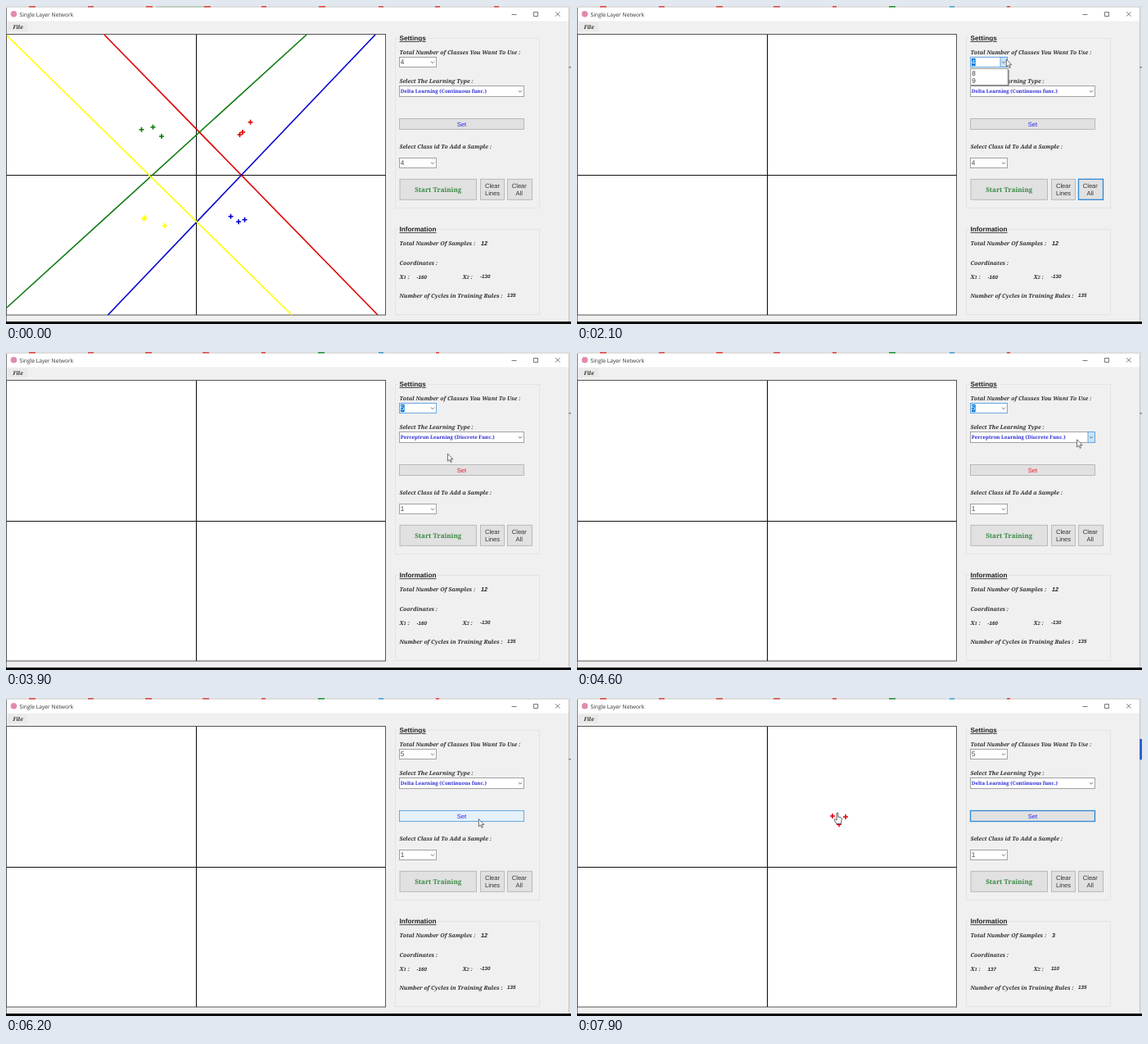
An HTML page that plays this animation: 690x388 px, repeating every 8 s.

```html
<!DOCTYPE html>
<html lang="en">
<head>
<meta charset="utf-8">
<title>Single Layer Network</title>
<style>
html, body { margin: 0; width: 100%; height: 100%; overflow: hidden; background: #f0f0f0; }
svg { display: block; width: 100vw; height: 100vh; }
text { white-space: pre; text-rendering: geometricPrecision; }
.label { font: italic bold 6.8px "Noto Serif", serif; fill: #2a2a2a; }
.combo { font: bold 6.1px "Noto Serif", serif; }
.train { font: bold 8px "Noto Serif", serif; fill: #3a8a44; }
.sans { font: 7.6px "Liberation Sans", Arial, sans-serif; fill: #333; }
.digit { font: 8.2px "Liberation Sans", Arial, sans-serif; }
.head { font: bold 8.2px "Liberation Sans", Arial, sans-serif; fill: #222; text-decoration: underline; }
.value { font: italic bold 6.2px "Liberation Sans", Arial, sans-serif; fill: #222; }
.title { font: 6.7px "Open Sans", "Noto Sans", sans-serif; fill: #333; }
.mid { text-anchor: middle; }
</style>
</head>
<body>
<svg id="stage" viewBox="0 0 690 388" preserveAspectRatio="none"></svg>
<script>
const LOOP = 8000, STEP = 100;
const BLUE = "#0078d7", SOFT_BLUE = "#5b9fdf";
const stage = document.getElementById("stage");

function add(tag, attrs, parent = stage) {
  const el = document.createElementNS("http://www.w3.org/2000/svg", tag);
  set(el, attrs);
  parent.appendChild(el);
  return el;
}
function set(el, attrs) {
  for (const key in attrs) el.setAttribute(key, attrs[key]);
}
const show = (el, on) => set(el, { visibility: on ? "visible" : "hidden" });
const group = (parent) => add("g", {}, parent);
const rect = (x, y, width, height, fill, stroke = "none", parent) =>
  add("rect", { x, y, width, height, fill, stroke }, parent);
const path = (d, stroke, width = 1, parent, fill = "none") =>
  add("path", { d, stroke, "stroke-width": width, fill }, parent);
function text(x, y, str, cls, parent, fill) {
  const el = add("text", { x, y, class: cls }, parent);
  el.textContent = str;
  if (fill) el.style.fill = fill;
  return el;
}

// Desktop edges and window frame
function ticks(list) {
  const g = group();
  for (const [x, w, color] of list) rect(x, 0, w, 1.6, color, "none", g);
  return g;
}
rect(0, 0, 690, 388, "#f0f0f0");
rect(0, 0, 690, 2, "#dedede");
const tabsBefore = ticks([[28, 8, "#e04b45"], [100, 7, "#d9534f"], [171, 8, "#e04b45"],
  [184, 60, "#b9cdbb"], [242, 8, "#e04b45"], [312, 6, "#e04b45"], [382, 8, "#e04b45"],
  [455, 6, "#d9534f"], [524, 6, "#e04b45"], [596, 6, "#d9534f"]]);
const tabsAfter = ticks([[28, 8, "#e04b45"], [100, 7, "#d9534f"], [170, 8, "#e04b45"],
  [240, 8, "#d9534f"], [312, 5, "#e04b45"], [381, 8, "#2c9a3f"], [455, 6, "#4aa3d8"],
  [525, 4, "#e04b45"]]);
rect(1, 2, 686, 16.5, "#fff");
rect(687, 2, 3, 383, "#e4e4e4");
path("M687.5 2V385", "#b5b5b5", .7);
rect(687, 74, 3, 1.5, "#8a8a8a");
const sideMark = rect(687, 50, 3, 25, "#2b63d9");
add("circle", { cx: 9.5, cy: 9.8, r: 3.8, fill: "#e28aae" });
text(16.5, 12.6, "Single Layer Network", "title");
path("M617.5 10.5H623.5M644.5 7.5H649.5V12.5H644.5ZM671 7.2L676.4 12.6M676.4 7.2L671 12.6", "#555", .8);
rect(2, 20, 24, 11, "#e9e9e9");
text(8.5, 28, "File", "label").style.fontSize = "6.5px";
rect(0, 385, 690, 3, "#060606");
path("M.4 2V385", "#555", .8);

// Plot area
rect(.5, 34.5, 463, 342.5, "#fff", "#555");
path("M232.5 35V377M1 206.5H463.5", "#111", 1.1);

const plus = (x, y, color, parent) =>
  path(`M${x - 3} ${y}h6M${x} ${y - 3}v6`, color, 1.6, parent);
const solved = group();
const classes = [
  ["#e00000", "M120 35L454 377", [[298.5, 141.7], [289, 154], [285.5, 157]]],
  ["#0b7a0b", "M1 368L367 35", [[165.5, 150.7], [179.5, 147.8], [190, 159]]],
  ["#0000d0", "M124.5 377L451 35", [[274.5, 256.7], [284, 263.3], [291.5, 260.8]]],
  ["#ffff00", "M1 36L349 377", [[169.2, 258.3], [168.4, 260], [194, 268]]]
];
for (const [color, line, points] of classes) {
  path(line, color, 1.6, solved);
  for (const [x, y] of points) plus(x, y, color, solved);
}
const samples = [
  { at: 7000, x: 320, y: 154.3 },
  { at: 7300, x: 328, y: 145 },
  { at: 7700, x: 312, y: 144 }
];
for (const s of samples) s.el = plus(s.x, s.y, "#e60012");

// Settings and information panels
function panel(y, h, title, titleY, w) {
  rect(475.5, y, 176, h, "none", "#e0e0e0").setAttribute("stroke-width", .8);
  rect(479, y - 2, w, 4, "#f0f0f0");
  text(480.5, titleY, title, "head");
}
panel(39.5, 207, "Settings", 42, 36);
panel(272.5, 104, "Information", 275.3, 47);
const labels = [
  [480.5, 58.6, "Total Number of Classes You Want To Use :"],
  [480.5, 93.6, "Select The Learning Type :"],
  [480.5, 174, "Select Class id To Add a Sample :"],
  [480.5, 291.8, "Total Number Of Samples :"],
  [480.5, 316, "Coordinates :"],
  [480.5, 355.6, "Number of Cycles in Training Rules :"]
];
for (const [x, y, str] of labels) text(x, y, str, "label");
function axisLabel(x, index) {
  const el = text(x, 333, "X", "label");
  add("tspan", { "font-size": 5.6 }, el).textContent = index;
  add("tspan", {}, el).textContent = " :";
}
axisLabel(480.5, 1);
axisLabel(557.5, 2);
const total = text(580, 292.2, "12", "value");
total.style.fontSize = "7.2px";
const coordX = text(501.5, 333.2, "", "value");
const coordY = text(579, 332, "", "value");
text(612, 355.4, "135", "value");

function combo(x, y, w, h, cls) {
  const box = rect(x + .5, y + .5, w - 1, h - 1, "#fff", "#999");
  box.setAttribute("stroke-width", .9);
  const arrow = rect(x + w - 9, y + .5, 8.5, h - 1, "#cce4f7", SOFT_BLUE);
  arrow.setAttribute("stroke-width", .9);
  const cx = x + w - 5, cy = y + h / 2 + .1;
  path(`M${cx - 2.1} ${cy - 1}l2.1 2.1l2.1 -2.1`, "#555", .8);
  const mark = rect(x + 1.8, y + 1.8, 1, h - 3.6, BLUE);
  const value = text(x + 1.8, y + h / 2 + (cls === "digit" ? 2.7 : 2.2), "", cls);
  return (str, color, { marked = false, hot = false } = {}) => {
    value.textContent = str;
    value.style.fill = marked ? "#fff" : color;
    show(mark, marked);
    show(arrow, hot);
    if (marked) set(mark, { width: value.getComputedTextLength() + .3 });
    set(box, { stroke: marked ? SOFT_BLUE : "#999" });
  };
}
const classCount = combo(480, 62, 46, 13, "digit");
const learning = combo(480, 97, 153, 14, "combo");
const classId = combo(480, 185, 46, 13, "digit");

const BUTTON_LOOK = {
  normal: ["#e1e1e1", "#b4b4b4", .9],
  hover: ["#e5f1fb", SOFT_BLUE, .9],
  down: ["#cce4f7", SOFT_BLUE, .9],
  focus: ["#e1e1e1", "#2f87d4", 1.3]
};
function button(x, y, w, h) {
  const el = rect(x, y, w, h, "#e1e1e1");
  return (state) => {
    const [fill, stroke, width] = BUTTON_LOOK[state];
    set(el, { fill, stroke, "stroke-width": width });
  };
}
const setButton = button(480.5, 137.5, 152, 13);
const setText = text(556.5, 147.1, "Set", "sans mid");
button(481, 211.3, 93.5, 25)("normal");
button(579.5, 211.3, 29, 25)("normal");
const clearAll = button(612.5, 211.3, 30, 25);
text(527.7, 226.8, "Start Training", "train mid");
[["Clear", 594, 222.4], ["Lines", 594, 231.2], ["Clear", 626.8, 222.4], ["All", 626.8, 231.2]]
  .forEach(([str, x, y]) => text(x, y, str, "sans mid"));

// Drop-down lists
const ROW = 9.3;
function list(x, y, w, items, cls, color) {
  const g = group();
  const shade = rect(x + 1.5, y + 1.5, w, 1, "#888", "none", g);
  const box = rect(x, y, w, 1, "#fff", "#777", g);
  box.setAttribute("stroke-width", .7);
  const mark = rect(x + .5, y, w - 1, ROW, BLUE, "none", g);
  const rows = items.map((str) => text(x + 1.5, 0, str, cls, g));
  // A partly open list shows its last rows, as it slides down
  return (open, visible = items.length, chosen = -1) => {
    g.style.display = open ? "" : "none";
    const height = visible * ROW + 1.5, hidden = items.length - visible;
    set(shade, { height });
    set(box, { height });
    set(mark, { y: y + .8 + (chosen - hidden) * ROW });
    mark.style.display = chosen >= hidden ? "" : "none";
    rows.forEach((row, i) => {
      set(row, { y: y + 8.2 + (i - hidden) * ROW });
      row.style.display = i < Math.floor(hidden) ? "none" : "";
      row.style.fill = i === chosen ? "#fff" : color;
    });
  };
}
const PERCEPTRON = "Perceptron Learning (Discrete Func.)";
const DELTA = "Delta Learning (Continuous func.)";
const countList = list(480.8, 76.5, 45.4, ["3", "4", "5", "6", "7", "8", "9"], "digit", "#333");
const typeList = list(480.8, 112, 152.4, [PERCEPTRON, DELTA], "combo", "#2a2ad4");

// Pointer
const arrowCursor = path("M0 0V9.2L2.1 7.3L3.6 10.6L5 10L3.6 6.8H6.5Z", "#333", .7, stage, "#fff");
const handCursor = path("M-.9 .6Q0 -.6 .9 .6V5L4.3 5.8Q5.6 6.2 5.3 8.3L4.4 13.6H-1L-3.6 9.2Q-4.2 7.6 -2.6 7.8L-.9 9.2Z",
  "#333", .8, stage, "#fff");
const track = [
  [500, 612, 285], [800, 636, 229], [900, 636.5, 227.5], [1700, 636.5, 227.5], [2000, 531, 76],
  [2100, 524.3, 65], [2600, 522, 66], [2700, 514, 70], [2800, 508, 92], [3000, 509, 96],
  [3100, 511, 103], [3300, 512, 104], [3900, 539.4, 124], [4200, 545, 122], [4700, 627, 103],
  [4900, 626, 104], [5200, 606.3, 124.3], [5300, 605, 125], [5800, 580, 145], [6200, 577.3, 147.6],
  [6400, 577.3, 147.6], [6500, 540, 152], [6600, 280, 190], [6700, 282, 188], [7000, 320, 153],
  [7300, 328, 144], [7500, 327, 143], [7700, 312, 142], [7900, 318, 140]
];
function pointer(t) {
  const next = track.findIndex((k) => k[0] > t);
  if (next < 0) return track[track.length - 1].slice(1);
  if (next === 0) return null;
  const [t0, x0, y0] = track[next - 1], [t1, x1, y1] = track[next];
  const p = (t - t0) / (t1 - t0);
  return [x0 + (x1 - x0) * p, y0 + (y1 - y0) * p];
}

function draw(t) {
  const within = (a, b) => t >= a && t < b;
  const cleared = t >= 1100;
  show(solved, !cleared);
  show(tabsBefore, !cleared);
  show(tabsAfter, cleared);
  show(sideMark, t >= 6800);

  const placed = samples.filter((s) => t >= s.at).length;
  samples.forEach((s, i) => show(s.el, i < placed));
  total.textContent = placed || 12;

  classCount(t < 3300 ? "4" : "5", "#444", {
    marked: within(2100, 4700), hot: within(2100, 3300)
  });
  const perceptron = within(3300, 5300);
  learning(perceptron ? PERCEPTRON : DELTA, "#2a2ad4", {
    marked: within(4700, 6000), hot: within(4600, 5300)
  });
  classId(t < 3300 ? "4" : "1", "#444");
  countList(within(2100, 3300), t < 2200 ? 2 : 7, t < 3000 ? 1 : 2);
  typeList(within(4800, 5200), 2, t < 5100 ? 0 : 1);

  clearAll(within(800, 1000) ? "hover" : within(1000, 1100) ? "down"
    : within(1100, 1800) ? "hover" : within(1800, 2200) ? "focus" : "normal");
  setButton(within(5700, 6000) ? "hover" : within(6000, 6200) ? "down"
    : within(6200, 6500) ? "hover" : t >= 6500 ? "focus" : "normal");
  setText.style.fill = within(3300, 6200) ? "#ee1c2c" : "#2a2aea";

  const pos = pointer(t), onPlot = t >= 6600;
  show(arrowCursor, pos && !onPlot);
  show(handCursor, pos && onPlot);
  if (pos) set(onPlot ? handCursor : arrowCursor, { transform: `translate(${pos})` });
  const live = t >= 6800;
  coordX.textContent = live ? Math.round((pos[0] - 232.5) * 1.6) : -160;
  coordY.textContent = live ? Math.round((208.75 - pos[1]) * 1.6) : -130;
}

const start = performance.now();
function tick() {
  const t = (performance.now() - start) % LOOP;
  draw(Math.floor(t / STEP) * STEP);
  requestAnimationFrame(tick);
}
tick();
</script>
</body>
</html>
```
